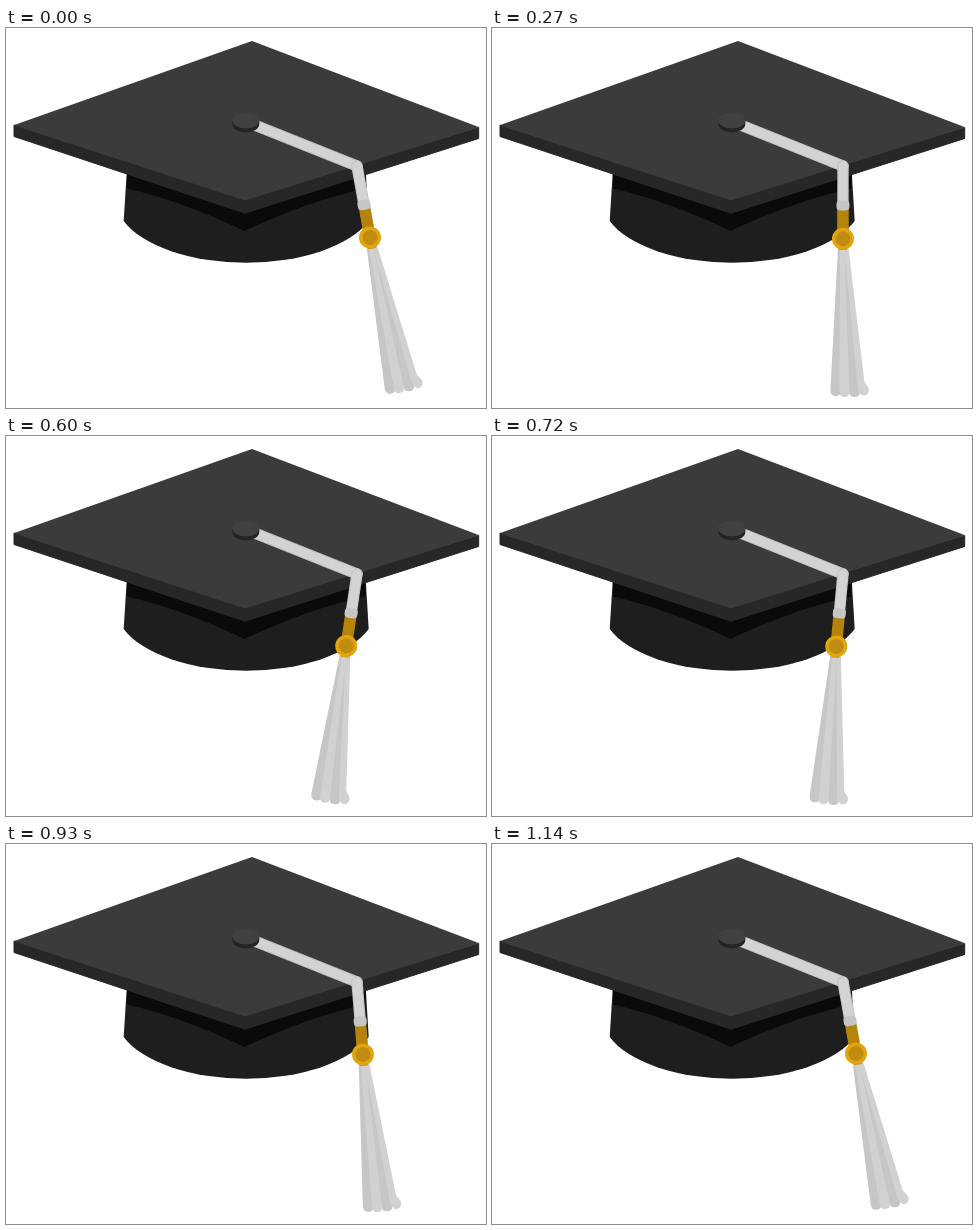
Recreate the animation shown at these times as an HTML page. Size 480 by 380 pixels, loop 1200 ms.

```html
<!DOCTYPE html>
<html lang="en">
<head>
<meta charset="utf-8">
<title>Graduation cap</title>
<style>
  html, body { margin: 0; width: 100%; height: 100%; overflow: hidden; background: #fff; }
  svg { display: block; width: 100vw; height: 100vh; }
  .edge, .cord { fill: none; stroke-linecap: round; }
  .edge { stroke: #c2c2c2; stroke-width: 11.4; }
  .cord { stroke: #d3d3d3; stroke-width: 9.4; }
  .strands { stroke-width: 2; stroke-linejoin: round; }
  .light { fill: #d1d1d1; stroke: #d1d1d1; }
  .dark { fill: #c6c6c6; stroke: #c6c6c6; }
  .side { fill: #272727; stroke: #272727; stroke-linejoin: round; }
</style>
</head>
<body>
<svg viewBox="0 0 480 380">
  <!-- skull cap and the board's shadow on it -->
  <path fill="#1e1e1e" d="M121 140L117.700 193A130 62.600 0 0 0 362.700 193L359.500 140Z"/>
  <path fill="#0a0a0a" d="M121 140V160.500Q176 173 238.500 203Q302 173 359.500 160.500V140Z"/>

  <!-- board -->
  <path class="side" d="M8 97V108.500L239 185.200L472.700 110.500V99.500L239 171Z"/>
  <path fill="#3b3b3b" d="M246 13L473.200 99.300L239 172.500L7.500 97.300Z"/>

  <path class="edge" d="M246 96L351 138"/>
  <path class="cord" d="M246 96L351 138"/>

  <g id="tassel">
    <path class="edge" d="M351 138V176"/>
    <path class="cord" d="M351 138V176"/>
    <g class="strands">
      <path class="dark" d="M347 220L339.500 361Q339 367 343.500 367T348 363L353 220Z"/>
      <path class="dark" d="M350 220L358 363Q358 368 362.500 368T367 364L355 220Z"/>
      <path class="light" d="M349 220L348.500 363Q348.500 368 352.500 368T356.500 364L351.500 220Z"/>
      <path class="light" d="M353 220L367 361Q369 367 372.500 366.500T376 361L371.500 354L355.500 220Z"/>
    </g>
    <rect x="345.200" y="180" width="11.600" height="24" fill="#b5830b"/>
    <rect x="347" y="216" width="8" height="6" fill="#c9940f"/>
    <rect x="344.500" y="172.500" width="13" height="10" rx="4" fill="#c6c6c6"/>
    <circle cx="351" cy="210.700" r="11" fill="#e0a50f"/>
    <circle cx="351" cy="210.700" r="7.500" fill="#c08c10"/>
  </g>

  <!-- button -->
  <path fill="#242424" d="M226.300 92V96A13.500 8.500 0 0 0 253.300 96V92Z"/>
  <ellipse cx="239.800" cy="92.500" rx="13.500" ry="8" fill="#404040"/>
</svg>
<script>
  const LOOP = 1200, STEP = 30;
  const RIGHT = -10.3, LEFT = 8.8;
  const tassel = document.getElementById('tassel');

  const ease = (t, from, to) => (1 - Math.cos(Math.PI * (t - from) / (to - from))) / 2;

  // Swing left, rest briefly, swing back, rest.
  function angle(t) {
    if (t < STEP || t >= 1140) return RIGHT;
    if (t < 540) return RIGHT + (LEFT - RIGHT) * ease(t, -18, 530);
    if (t < 600) return LEFT;
    return LEFT + (RIGHT - LEFT) * ease(t, 555, 1145);
  }

  function draw(now) {
    const t = Math.floor((now % LOOP) / STEP) * STEP;
    tassel.setAttribute('transform', `rotate(${angle(t).toFixed(3)} 351 138)`);
    requestAnimationFrame(draw);
  }
  draw(performance.now());
</script>
</body>
</html>
```
